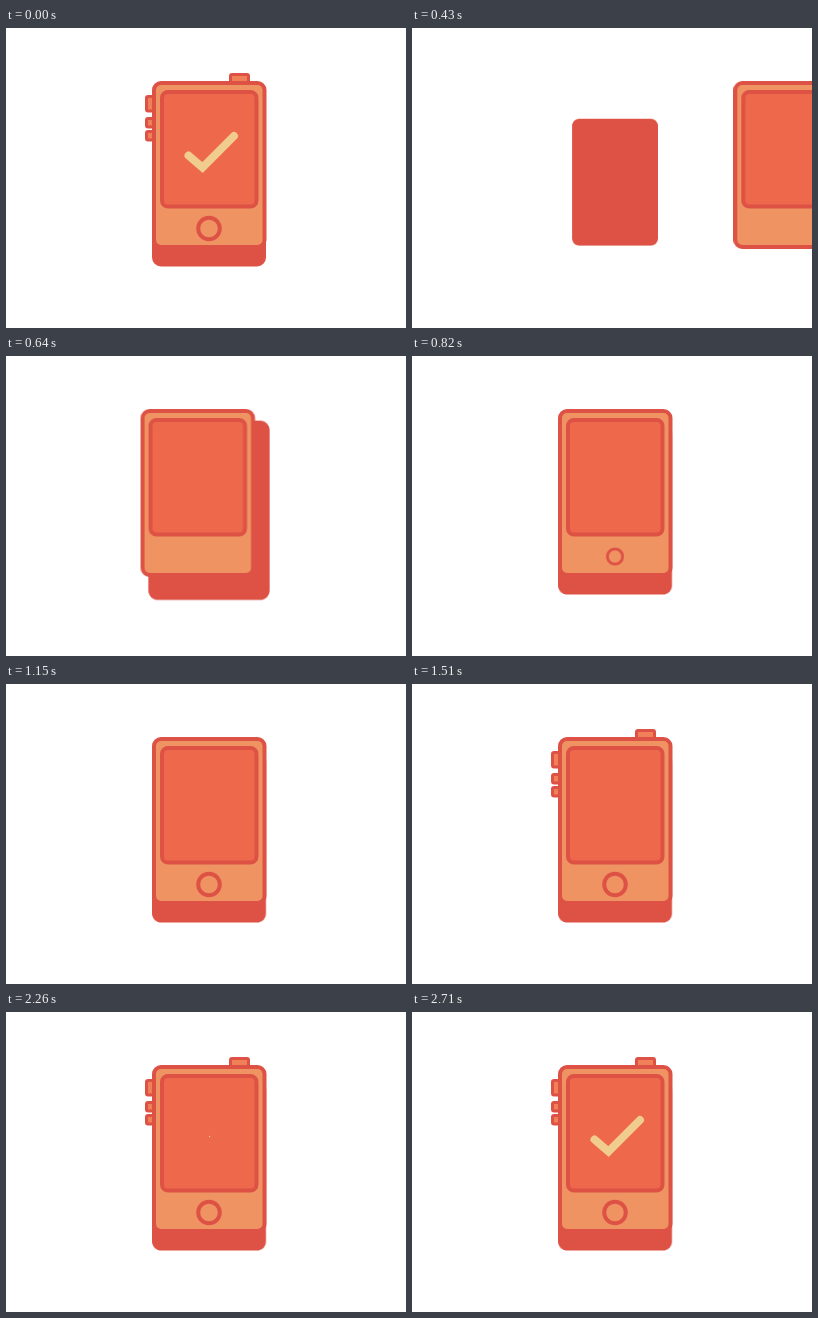
An HTML page without scripts for the animation above (3.07 s loop, 400 by 300 pixels).

```html
<!DOCTYPE html>
<html lang="en">
<head>
<meta charset="utf-8">
<title>Phone payment</title>
<style>
  html, body { margin: 0; width: 100%; height: 100%; overflow: hidden; background: #fff; }
  svg { display: block; width: 100%; height: 100%; }

  .edge { stroke: #de5246; stroke-width: 4; }
  .red { fill: #de5246; }
  .orange { fill: #ef9363; }
  .screen { fill: #ee684b; }
  .key { fill: #ef8058; stroke-width: 3; }
  .cream { fill: #e8d3a0; }
  .line { fill: none; stroke-width: 3.5; }
  .tick { fill: none; stroke: #f0cc8f; stroke-width: 8; stroke-linecap: round; }

  .plate, .panel, .home, .side, .top, .bill, .check {
    animation: 3070ms ease-in-out infinite;
  }
  .plate { animation-name: plate; transform-origin: 203px 154px; }
  .panel { animation-name: panel; }
  .home  { animation-name: home; transform-origin: 203px 200.5px; }
  .side  { animation-name: side; }
  .top   { animation-name: top; }
  .bill  { animation-name: bill; }
  .check { animation-name: check; transform-origin: 205px 124px; }

  @keyframes plate {
    0%, 2.27% { transform: scale(1); }
    2.28% { transform: scale(0); }
    5.21% { transform: scale(0); animation-timing-function: linear; }
    16.94% { transform: scale(1); animation-timing-function: ease-out; }
    19.4% { transform: scale(1.19); }
    22.48% { transform: scale(.92); }
    25.08% { transform: scale(1.03); }
    26.71%, 100% { transform: scale(1); }
  }
  @keyframes panel {
    0%, 2.27% { transform: translateX(0); }
    2.28% { transform: translateX(254px); }
    12.18% { transform: translateX(254px); animation-timing-function: linear; }
    18.18% { transform: translateX(0); animation-timing-function: ease-out; }
    19.48% { transform: translateX(-34px); }
    22.48% { transform: translateX(17px); }
    25.08% { transform: translateX(-4px); }
    26.71%, 100% { transform: translateX(0); }
  }
  @keyframes home {
    0%, 2.27% { transform: scale(1); }
    2.28% { transform: scale(0); }
    21.17% { transform: scale(0); animation-timing-function: linear; }
    29.09% { transform: scale(1); animation-timing-function: ease-out; }
    30.62% { transform: scale(1.19); }
    32.9% { transform: scale(.92); }
    34.85% { transform: scale(1.03); }
    36.48%, 100% { transform: scale(1); }
  }
  @keyframes side {
    0%, 2.27% { transform: translateX(0); opacity: 1; }
    2.28%, 36.8% { transform: translateX(11px); opacity: 0; }
    36.81% { transform: translateX(11px); opacity: 1; animation-timing-function: linear; }
    40.39% { transform: translateX(0); opacity: 1; animation-timing-function: ease-out; }
    41.69% { transform: translateX(-5px); }
    44.3% { transform: translateX(2px); }
    46.58% { transform: translateX(-1px); }
    49.19%, 100% { transform: translateX(0); opacity: 1; }
  }
  @keyframes top {
    0%, 2.27% { transform: translateY(0); opacity: 1; }
    2.28%, 36.8% { transform: translateY(10px); opacity: 0; }
    36.81% { transform: translateY(10px); opacity: 1; animation-timing-function: linear; }
    40.39% { transform: translateY(0); opacity: 1; animation-timing-function: ease-out; }
    41.69% { transform: translateY(-4px); }
    44.3% { transform: translateY(2px); }
    46.58% { transform: translateY(-1px); }
    49.19%, 100% { transform: translateY(0); opacity: 1; }
  }
  @keyframes bill {
    0%, 55.69% { transform: translate(203.5px, 150px); opacity: 0; }
    55.7% { transform: translate(203.5px, 150px); opacity: 1; animation-timing-function: linear; }
    64.82% { transform: translate(203.5px, 258px); opacity: 1; animation-timing-function: linear; }
    72.96% { transform: translate(203.5px, 372px); opacity: 1; }
    72.97%, 100% { transform: translate(203.5px, 372px); opacity: 0; }
  }
  @keyframes check {
    0%, 2.27% { transform: scale(1); }
    2.28% { transform: scale(0); }
    73.29% { transform: scale(0); animation-timing-function: linear; }
    78.18% { transform: scale(1); animation-timing-function: ease-out; }
    79.8% { transform: scale(1.19); }
    82.41% { transform: scale(.92); }
    85.02% { transform: scale(1.03); }
    88.27%, 100% { transform: scale(1); }
  }
</style>
</head>
<body>
<svg viewBox="0 0 400 300">
  <g class="side">
    <rect class="edge key" x="140.5" y="68.5" width="14" height="14.5" rx="1.5"/>
    <rect class="edge key" x="140.5" y="90.5" width="14" height="8.5" rx="1.5"/>
    <rect class="edge key" x="140.5" y="103.5" width="14" height="8.5" rx="1.5"/>
  </g>
  <rect class="edge key top" x="224.5" y="46.5" width="18" height="14" rx="1.5"/>

  <rect class="plate red" x="146" y="70" width="114" height="168.5" rx="9"/>

  <g class="bill">
    <rect class="edge cream" x="-31.5" y="-68" width="63" height="136" rx="2"/>
    <g class="edge line">
      <path d="M-20.5-31V-56H21V-31M-20.5 31V56H21V31"/>
      <circle cy="-40" r="7.5"/>
      <circle cy="40" r="7.5"/>
      <circle r="22"/>
      <path transform="rotate(90)" stroke-width="3" d="M0-14V14M7-5C6-11-7-11-7-5C-7 1 7-1 7 5C7 11-6 11-7 5"/>
    </g>
  </g>

  <g class="panel">
    <rect class="edge orange" x="148" y="55" width="110.5" height="164" rx="7"/>
    <rect class="edge screen" x="156" y="64" width="94.5" height="114.5" rx="6"/>
    <circle class="home edge line" style="stroke-width: 4" cx="203" cy="200.5" r="10.8"/>
  </g>

  <path class="check tick" d="M182.5 127.5L196.5 139.5L228 108"/>
</svg>
</body>
</html>
```
